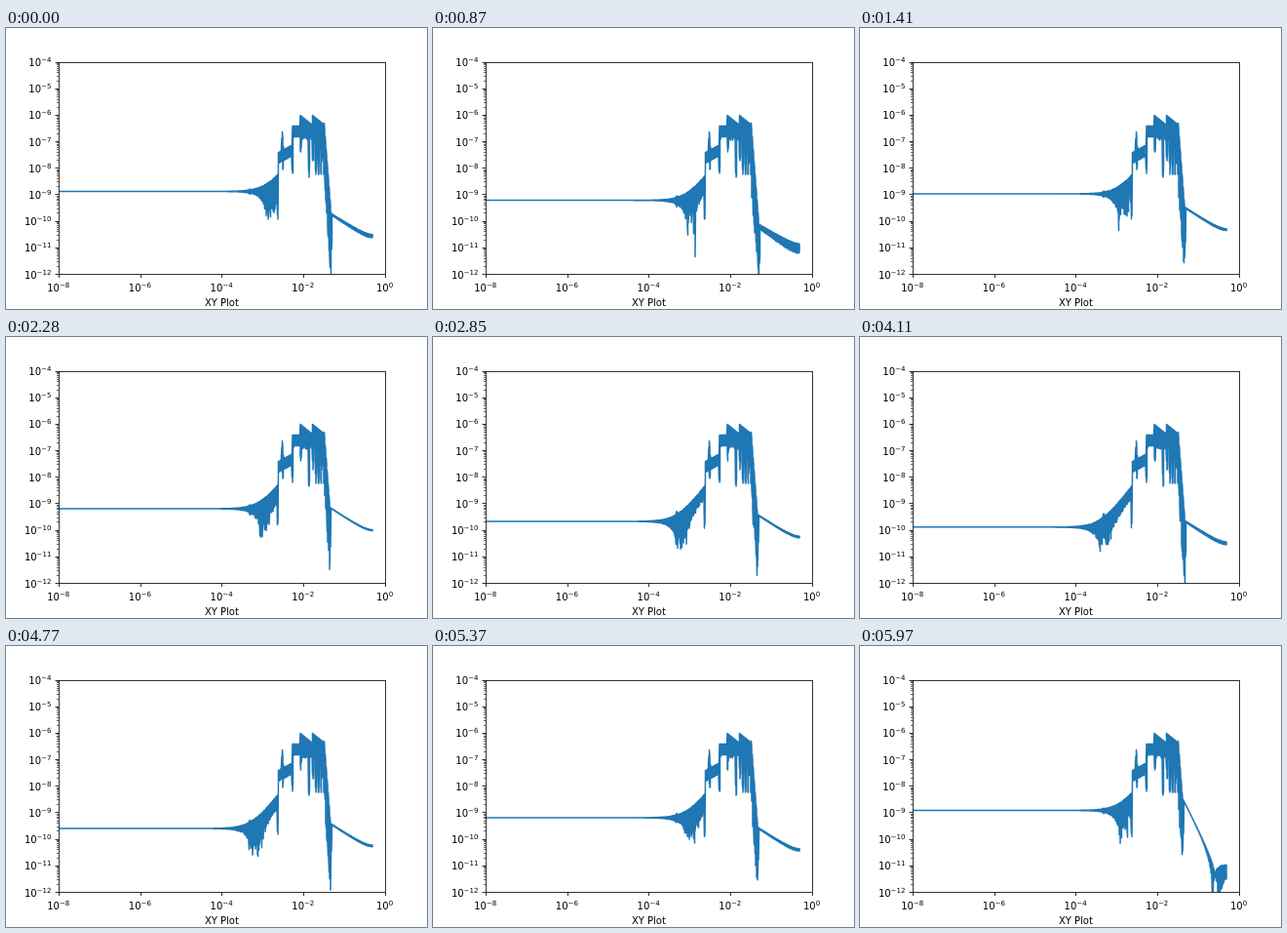
Recreate the animation shown at these times as an HTML page. Size 432 by 288 pixels, loop 6000 ms.

```html
<!DOCTYPE html>
<html lang="en">
<head>
<meta charset="utf-8">
<title>XY Plot</title>
<style>
  html, body { margin: 0; width: 100%; height: 100%; overflow: hidden; background: #fff; }
  svg { display: block; width: 432px; height: 288px; }
  text { font: 10px "DejaVu Sans", sans-serif; }
  .sup { font-size: 7px; }
  .axis { fill: none; stroke: #000; stroke-width: .8; }
  #minor { stroke-width: .6; }
  #curve { fill: none; stroke: #1f77b4; stroke-width: 1.5; stroke-linejoin: round; stroke-linecap: square; }
</style>
</head>
<body>
<svg viewBox="0 0 432 288">
  <clipPath id="area"><rect x="54" y="34.56" width="334.8" height="217.44"/></clipPath>
  <path id="major" class="axis"/>
  <path id="minor" class="axis"/>
  <g clip-path="url(#area)"><path id="curve"/></g>
  <rect class="axis" x="54.5" y="35.5" width="335" height="217"/>
  <g id="labels"></g>
  <text x="221.4" y="285" text-anchor="middle">XY Plot</text>
</svg>
<script>
const LEFT = 54, RIGHT = 388.8, BOTTOM = 252, DX = 41.85, DY = 27.18;
const STEP = 30, STEPS = 200;
const $ = id => document.getElementById(id);
const curve = $('curve');

const snap = v => Math.floor(v + .5) + .5;
const toY = v => BOTTOM - DY * (Math.log10(Math.max(v, 1e-14)) + 12);
const toValue = y => 10 ** ((BOTTOM - y) / DY - 12);

function power(exp, x, y, anchor) {
  const sign = exp < 0 ? '\u2212' : '';
  return `<text x="${x}" y="${y}" text-anchor="${anchor}">10<tspan class="sup" dy="-3.8">${sign}${Math.abs(exp)}</tspan></text>`;
}

function drawAxes() {
  let major = '', minor = '', labels = '';
  for (let i = 0; i <= 8; i++) {
    const y = BOTTOM - i * DY;
    major += `M50.5 ${snap(y)}H54`;
    labels += power(i - 12, 46.4, Math.round(y + 4.5), 'end');
    for (let n = 2; n < 10 && i < 8; n++) minor += `M52 ${snap(y - DY * Math.log10(n))}H54`;
    if (i % 2 === 0) {
      const x = LEFT + i * DX;
      major += `M${snap(x)} 252.5V256`;
      labels += power(i - 8, x - .3, 270, 'middle');
    }
  }
  $('major').setAttribute('d', major);
  $('minor').setAttribute('d', minor);
  $('labels').innerHTML = labels;
}

// Step, baseline y, tail strength in 1e-12
const KEYS = [
  [0, 167.5, 27], [29, 176.6, 10], [47, 170, 47], [76, 176, 97],
  [115, 202.7, 9], [159, 187, 54], [190, 170, 30], [199, 168.5, -14]
];

// Downward notches of the band: x, bottom y
const NOTCHES = [[284, 145], [294, 149], [302.5, 127], [311, 153], [315, 136]];
for (let x = 318; x < 327; x += 2.7) NOTCHES.push([x, 150]);

function keyAt(step) {
  let i = 0;
  while (i < KEYS.length - 2 && step > KEYS[i + 1][0]) i++;
  const a = KEYS[i], b = KEYS[i + 1];
  const u = (step - a[0]) / (b[0] - a[0]);
  return a.map((v, k) => v + (b[k] - v) * u);
}

function random(seed) {
  let s = seed * 7919 + 17;
  return () => {
    s = s + 0x6D2B79F5 | 0;
    let t = Math.imul(s ^ s >>> 15, 1 | s);
    t = t + Math.imul(t ^ t >>> 7, 61 | t) ^ t;
    return ((t ^ t >>> 14) >>> 0) / 4294967296;
  };
}

const bump = (x, mid, width) => Math.exp(-(((x - mid) / width) ** 2));
const fallAt = x => 104 + (x - 327) * 13;

// Two plateaus, two sawteeth and a steep fall
function bandTop(x) {
  if (x < 294) return 128 - (x - 279) * .55 - 19 * bump(x, 283.5, .8);
  if (x < 302) return 100.5;
  if (x < 326.5) return 89.5 + (x - 302) % 12.5 * .8;
  return fallAt(x);
}

function build(step) {
  const rnd = random(step + 1);
  const [, base, strength] = keyAt(step);
  const level = toValue(base);

  // Constant level plus leakage that grows with the square of the frequency
  function rise(x) {
    const line = bump(x, 250, .8);
    const amp = 3.6e-9 * 10 ** (2 * (x - 277) / DX) * (1 + .6 * line);
    const w = .7 - .2 * line;
    let lo = Infinity, hi = 0;
    for (let i = 0; i < 25; i++) {
      const p = rnd() * 2 * Math.PI, q = rnd() * 2 * Math.PI;
      const re = level + amp * (w * Math.cos(p) + (1 - w) * Math.cos(q));
      const im = amp * (w * Math.sin(p) + (1 - w) * Math.sin(q));
      const v = Math.hypot(re, im);
      lo = Math.min(lo, v);
      hi = Math.max(hi, v);
    }
    const notch = x > 278 ? 190 + rnd() * 7 : 0;
    return [toY(hi), Math.max(toY(lo), notch)];
  }

  // A negative strength brings in a steeper term of opposite sign
  function tailValue(x) {
    const s = Math.sin(Math.PI * 10 ** ((x - RIGHT) / DX));
    return 1e-12 * (strength / s + Math.max(0, -strength) * .54 / s ** 3);
  }

  function tail(x) {
    const v = tailValue(x);
    const noise = 4e-12 * 10 ** ((376 - x) / DX * .5);
    const a = Math.abs(v + noise * (.75 + .25 * rnd()));
    const b = Math.abs(v - noise * (.75 + .25 * rnd()));
    return [toY(Math.max(a, b)), toY(Math.min(a, b))];
  }

  const meetY = toY(tailValue(333));
  const meetX = 327 + (meetY - 104) / 13;
  const dipX = meetX - .7;
  const dipY = meetY + 42 + rnd() * 8;

  function band(x) {
    const up = bandTop(x);
    let low = up + 11;
    if (x > 302) low = Math.max(low, 109 + rnd() * 6);
    if (x > 317) low += 10;
    if (x > 326.5) low = up + 45 + rnd() * 25;
    for (const [mid, bottom] of NOTCHES) {
      const near = 1 - Math.abs(x - mid) / 1.2;
      if (near > 0) low = Math.max(low, up + (bottom - up) * Math.min(1, near * (1.3 + rnd() * .4)));
    }
    const near = 1 - Math.abs(x - dipX) / 2.5;
    if (near > 0) low = Math.max(low, up + (dipY - up) * near);
    return [up, low];
  }

  let d = `M${LEFT} ${base}H200`;
  for (let x = 200; x <= 376.2; x += .5) {
    const pair = x < 279.3 ? rise(x) : x < meetX ? band(x) : tail(x);
    if (x >= meetX && x < meetX + 1) pair[1] = dipY - (x - meetX) * 15;
    if (x % 1) pair.reverse();
    d += `L${x} ${pair[0].toFixed(2)}V${pair[1].toFixed(2)}`;
  }
  return d;
}

let shown = -1;
const began = performance.now();
function draw(now) {
  const step = Math.floor(Math.max(0, now - began) / STEP) % STEPS;
  if (step !== shown) {
    shown = step;
    curve.setAttribute('d', build(step));
  }
  requestAnimationFrame(draw);
}
drawAxes();
draw(began);
</script>
</body>
</html>
```
